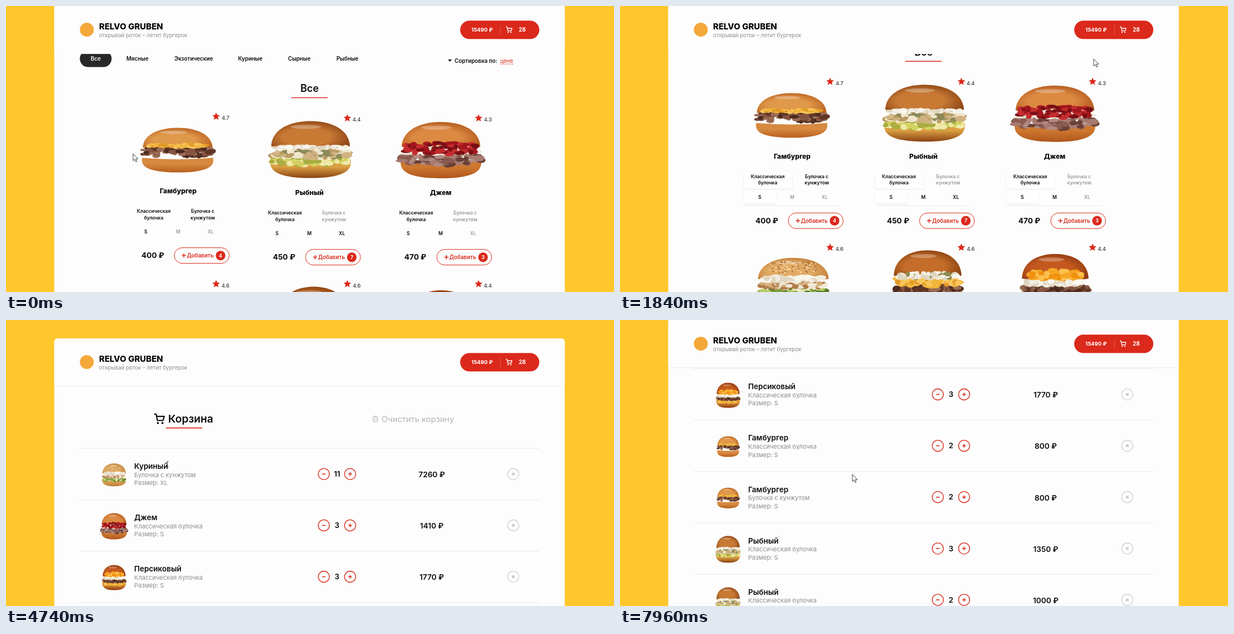
Write an HTML page that moves like this. It is 1091 by 513 pixels and loops after 7.99 s.

```html
<!DOCTYPE html>
<html lang="ru">
<head>
<meta charset="utf-8">
<style>
html, body { margin: 0; height: 100%; overflow: hidden; background: #ffc72c }
svg { display: block; width: 100%; height: 100%; font-family: Inter, "Open Sans", sans-serif }
</style>
</head>
<body>
<svg id="stage" viewBox="0 0 1091 513"></svg>
<script>
const RED = '#db291b', INK = '#0b0b0b', PAPER = '#fdfdfd', GRAY = '#8d8d8d';
const LOOP = 7990, NOTCH = 65.4, OPEN_CART = 3470;

// ---- drawing helpers; text is placed by the middle of its capitals
const text = (x, y, s, size, weight = 600, fill = INK, anchor = 'start') =>
  `<text x="${x}" y="${y + size * .36}" font-size="${size}" font-weight="${weight}" fill="${fill}" text-anchor="${anchor}">${s}</text>`;
const mid = (x, y, s, size, weight, fill) => text(x, y, s, size, weight, fill, 'middle');
const rect = (x, y, w, h, fill, r = 0, more = '') =>
  `<rect x="${x}" y="${y}" width="${w}" height="${h}" rx="${r}" fill="${fill}" ${more}/>`;
const stroke = (d, color, width = 1, more = '') =>
  `<path d="${d}" fill="none" stroke="${color}" stroke-width="${width}" ${more}/>`;
const ring = (x, y, r, color, width = 1.2) =>
  `<circle cx="${x}" cy="${y}" r="${r}" fill="none" stroke="${color}" stroke-width="${width}"/>`;
const group = (id, body, more = '') => `<g id="${id}" ${more}>${body}</g>`;
const cartIcon = (x, y, k, color) =>
  `<g transform="translate(${x} ${y}) scale(${k})">` +
  stroke('M0 1H4L7 15H19L22 6H6', color, 2.6, 'stroke-linejoin="round"') +
  `<circle cx="8" cy="20.5" r="2.3" fill="${color}"/><circle cx="18" cy="20.5" r="2.3" fill="${color}"/></g>`;
const star = (x, y) => {
  const points = Array.from({length: 10}, (_, i) => {
    const r = i % 2 ? 3.3 : 7.2, a = i * Math.PI / 5;
    return `${x + r * Math.sin(a)},${y - r * Math.cos(a)}`;
  });
  return `<polygon points="${points.join(' ')}" fill="${RED}"/>`;
};

// ---- burgers, in a box of 150 by 100 around 0,0
let seed = 7;
const rnd = () => (seed = seed * 16807 % 2147483647) / 2147483647 - .5;
// a band of crumbs, thinner towards its ends
const crumbs = (y, width, height, size, colors) => Array.from({length: 90}, (_, i) => {
  const u = rnd() * 2, v = rnd() * height * Math.sqrt(1 - u * u * .7);
  return `<ellipse cx="${u * width / 2}" cy="${y + v}" rx="${size * (1.2 + rnd())}" ry="${size * (.7 + rnd() * .5)}" fill="${colors[i % colors.length]}"/>`;
}).join('');

const meat = ['#5f3626', '#845440', '#4d2b1e', '#9a6b55'], cream = ['#f1ece0', '#e0d6c0', '#faf7ef'],
  cheese = ['#f2b53a', '#e39a28', '#f8c65a'];
// light and dark crust, lower bun, layers: middle, width, height, crumb, colours
const kinds = {
  ham: ['#e0984a', '#b9601f', '#d78a40', [[4, 132, 22, 6, meat], [-10, 112, 8, 4, cheese]]],
  fish: ['#c87a35', '#8a4212', '#dba044',
    [[20, 132, 14, 5, ['#d3d160', '#efe9a8', '#a9ad40']], [7, 128, 14, 6, ['#cfb280', '#efe6cc', '#8c8a58', '#b99a62']], [-4, 126, 4, 4, cream]]],
  jam: ['#dc8a42', '#b0561c', '#cd7730',
    [[16, 140, 20, 6, ['#8b5d52', '#6b4036', '#a67a70', '#b08a80']], [0, 128, 14, 5, cream], [-3, 124, 20, 5, ['#a3161d', '#c42c2e', '#7a0f16']]]],
  chicken: ['#e2ab64', '#c07c36', '#d99f54',
    [[21, 132, 16, 5, ['#7f9f3a', '#b4ca66', '#567a26', '#e4e3b0']], [7, 122, 14, 5, ['#d5ab76', '#b07c4a', '#f1e8d6']], [-6, 114, 10, 6, cream]]],
  cheesy: ['#c46c2a', '#85400f', '#cf8438',
    [[20, 128, 16, 6, meat], [4, 126, 16, 6, cheese], [-6, 118, 10, 5, [...cream, '#8f8a50']]]],
  peach: ['#c4591f', '#8d3a10', '#d68a34',
    [[26, 122, 10, 5, cheese], [13, 130, 14, 6, meat], [1, 116, 10, 6, cream], [-12, 106, 16, 6, ['#f6a623', '#fcc04d', '#f09010']]]]
};
const burgerDefs = Object.entries(kinds).map(([id, [light, dark, base, layers]]) => {
  const seeds = id == 'chicken' ? crumbs(-30, 90, 26, 1.4, ['#f6e3bd', '#8d5a2c']) : '';
  return `<radialGradient id="${id}Top" cx=".45" cy=".55" r=".6"><stop stop-color="${light}"/><stop offset=".5" stop-color="${light}"/><stop offset="1" stop-color="${dark}"/></radialGradient>` +
    `<linearGradient id="${id}Base" x2="0" y2="1"><stop offset=".4" stop-color="${base}"/><stop offset="1" stop-color="${dark}"/></linearGradient>` +
    group(id,
      `<path d="M-68 17Q0 24 68 17C72 36 58 50 0 50S-72 36-68 17Z" fill="url(#${id}Base)"/>` +
      `<path d="M-67-6C-66-34-38-50 0-50S66-34 67-6Q0 8-67-6Z" fill="url(#${id}Top)"/>` +
      `<ellipse cx="-8" cy="-40" rx="26" ry="3.5" fill="#fff" opacity=".28"/>` + seeds +
      layers.map(l => crumbs(...l)).join(''));
}).join('');
const burger = (id, x, y, w, h) =>
  `<use href="#${id}" transform="translate(${x} ${y}) scale(${w / 150} ${h / 100})"/>`;

// ---- menu page
const tab = (x, y, w, h) =>
  rect(x - .5, y + 2, w + 1, h - 1, '#e7e7e7', 3) + rect(x, y, w, h, '#fefefe', 3);
const addButton = (count, front, back) =>
  rect(302, 502, 98.5, 28, back, 14, `stroke="${RED}"`) +
  stroke('M315.5 516H323M319.2 512.2V519.8', front, 1.5) +
  text(324.5, 516, 'Добавить', 9.8, 600, front) +
  `<circle cx="385" cy="516" r="8.6" fill="${front}"/>` + mid(385, 516, count, 8.8, 700, back);

const card = ([name, rating, price, count, sesame, sizes, art], i) => {
  const tone = on => on ? INK : '#9a9a9a';
  const body = burger(...art) + star(377, 266.5) +
    text(401, 269.3, rating, 9.6, 400, '#222', 'end') +
    mid(309, 400.5, name, 12.1, 800) +
    `<g class="soft">${tab(222, 427, 87, 32)}${tab(222, 464, 58, 21)}${stroke('M225 489H391', '#e8e8e8')}</g>` +
    mid(265, 436.3, 'Классическая', 8.5) + mid(265, 448, 'булочка', 8.5) +
    mid(353, 436.3, 'Булочка с', 8.5, 600, tone(sesame)) + mid(353, 448, 'кунжутом', 8.5, 600, tone(sesame)) +
    ['S', 'M', 'XL'].map((s, k) => mid(250.7 + 58.3 * k, 473.3, s, 8.5, 600, tone(k < sizes))).join('') +
    mid(263.5, 516, price + ' ₽', 13.6, 700) +
    addButton(count, RED, PAPER) + group('fill' + i, addButton(count, '#fff', RED), 'opacity="0"');
  return `<g transform="translate(${235.5 * (i % 3)} ${i > 2 ? 297.5 : 0})">${group('card' + i, body)}</g>`;
};
const cards = [
  ['Гамбургер', 4.7, 400, 4, 1, 1, ['ham', 308, 327, 140, 80]],
  ['Рыбный', 4.4, 450, 7, 0, 3, ['fish', 311, 323, 158, 102]],
  ['Джем', 4.3, 470, 3, 0, 2, ['jam', 309.5, 324, 158, 101]],
  ['Куриный', 4.6, 660, 11, 1, 3, ['chicken', 311, 328, 142, 86]],
  ['Сырный', 4.6, 500, 2, 0, 2, ['cheesy', 316.5, 323, 136, 103]],
  ['Персиковый', 4.4, 590, 3, 0, 2, ['peach', 310, 328, 134, 100]]
];
const filters = [['Мясные', 216], ['Экзотические', 302], ['Куриные', 416.5], ['Сырные', 506], ['Рыбные', 593]];
const menu = rect(132.5, 145, 57, 30, '#282828', 15) + mid(161, 160, 'Все', 9.8, 600, '#fff') +
  filters.map(([s, x]) => text(x, 160, s, 9.8)).join('') +
  `<path d="M793 161.3H800L796.5 165.2Z" fill="${INK}"/>` +
  text(805, 163.5, 'Сортировка по:', 9.8) + text(887, 163.5, 'цене', 9.8, 400, RED) +
  stroke('M887 169.5H911', RED, 1, 'stroke-dasharray="2 1.5"') +
  mid(544.7, 213, 'Все', 18, 600) + stroke('M512 230H577', RED, 1.5) +
  cards.map(card).join('');

// ---- cart page
const CLASSIC = 'Классическая булочка', SESAME = 'Булочка с кунжутом';
const rows = [
  ['Куриный', SESAME, 'XL', 11, 7260, 'chicken', 47, 41],
  ['Джем', CLASSIC, 'S', 3, 1410, 'jam', 50, 47],
  ['Персиковый', CLASSIC, 'S', 3, 1770, 'peach', 46, 45],
  ['Гамбургер', CLASSIC, 'S', 2, 800, 'ham', 43, 37],
  ['Гамбургер', SESAME, 'S', 2, 800, 'ham', 43, 37],
  ['Рыбный', CLASSIC, 'S', 3, 1350, 'fish', 47, 48],
  ['Рыбный', CLASSIC, 'XL', 2, 1000, 'fish', 47, 48]
];
const row = ([name, bun, size, count, sum, art, w, h], i) => {
  const y = 230.3 + 92.1 * i, c = y + 46;
  return stroke(`M132 ${y}H957`, '#e8e8e8') + burger(art, 194, y + 47.5, w, h) +
    text(230, y + 32, name, 13.5) +
    text(230, y + 47.5, bun, 11, 400, GRAY) + text(230, y + 62, 'Размер: ' + size, 11, 400, GRAY) +
    ring(570.3, c, 10, RED, 1.3) + ring(617.5, c, 10, RED, 1.3) +
    stroke(`M567 ${c}h6.6M614.2 ${c}h6.6m-3.3-3.3v6.6`, RED, 1.5) +
    mid(594, c, count, 13.3, 600) + mid(764, c + 1, sum + ' ₽', 13.6, 600) +
    ring(910.3, c, 10, '#cacaca') + stroke(`M908 ${c - 2.3}l4.6 4.6m0-4.6l-4.6 4.6`, '#b4b4b4', 1.3);
};
const cart = cartIcon(266, 168, .82, INK) + text(291, 177.5, 'Корзина', 19.2, 600) +
  stroke('M287 193.7H352', RED, 1.7) +
  stroke('M657.5 174H668M661 174V172.3H664.5V174M658.7 174V182.7H666.8V174M661.3 176.5V180.5M664.2 176.5V180.5', '#b6b6b6') +
  text(674, 177.5, 'Очистить корзину', 14.7, 400, '#b4b4b4') + rows.map(row).join('');

// ---- sticky header
const header = rect(86.6, 0, 916, 86, PAPER, 6) +
  group('edge', stroke('M91 85.5H999', '#ebebeb')) +
  '<circle cx="145" cy="42.5" r="12.5" fill="#f4a83a"/>' +
  text(167, 36.3, 'RELVO GRUBEN', 15, 800) +
  text(167, 52.2, 'открывай роток – летит бургерок', 9.7, 400, GRAY) +
  rect(815, 26.3, 142, 33, RED, 16.5) + group('dark', rect(815, 26.3, 142, 33, '#b72218', 16.5)) +
  text(835, 42.6, '15490 ₽', 9.6, 700, '#fff') + stroke('M887.3 35V51', '#fff', 1, 'opacity=".25"') +
  cartIcon(897, 37, .5, '#fff') + group('total', text(920, 42.6, '28', 10, 700, '#fff')) +
  group('go', stroke('M921.5 42.5H931M927 38.3L931.2 42.5L927 46.7', '#fff', 1.5));

const pointer = d => `<path d="${d}" fill="#fff" stroke="#111" stroke-width=".8" stroke-linejoin="round"/>`;
const cursors = {
  arrow: pointer('M0 0V12.5L2.9 9.9L4.9 14.5L6.9 13.6L5 9.2H8.9Z'),
  hand: pointer('M-1.5 1.5Q0-.9 1.5 1.5V6.5L7 8Q8.8 8.6 8.4 11L7.4 16H.4L-4 10.4Q-4.6 8.4-2.8 8.5L-1.5 9.6Z'),
  beam: stroke('M-2.2-5Q0-5 0-4Q0-5 2.2-5M0-4V4M-2.2 5Q0 5 0 4Q0 5 2.2 5', '#222', .9)
};

stage.innerHTML = `<defs>${burgerDefs}</defs>` + rect(0, 0, 1091, 513, '#ffc72c') +
  group('page', rect(86.6, 33, 916, 1300, PAPER, 6) + group('menu', menu) + group('cart', cart)) +
  group('head', header) +
  group('cursor', Object.entries(cursors).map(([id, body]) => group(id, body)).join(''));
const el = id => document.getElementById(id);
const soft = document.querySelectorAll('.soft');

// ---- motion
const ramp = (t, a, b) => {
  const u = Math.min(1, Math.max(0, (t - a) / (b - a)));
  return u * u * (3 - 2 * u);
};
// start, end and direction of each wheel notch
const notches = [[310, 470, 1], [1920, 2070, -1], [2110, 2260, -1], [5500, 5655, 1],
  [5960, 6230, 1], [6520, 6720, 1], [6970, 7150, 1], [7400, 7560, 1]];
const track = [[0, 228, 265], [500, 228, 265], [1060, 300, 330], [1110, 300, 330], [1330, 580, 378],
  [1420, 664.5, 382], [1600, 780, 300], [1840, 850, 95], [1920, 850, 95], [2300, 924, 138],
  [2690, 925, 86], [2750, 925, 86], [2860, 924, 73], [2980, 922.5, 80], [3890, 922.5, 80],
  [4680, 294, 258], [4710, 294, 258], [4850, 274, 261], [7590, 274, 261], [7960, 417, 277], [LOOP, 417, 277]];
const lifts = [[-200, -100, 1110, 1260], [1200, 1300, 1430, 1560], [1480, 1600, 1720, 1840]];
const pulse = (t, [a, b, c, d]) => ramp(t, a, b) - ramp(t, c, d);

const place = (t) => {
  const i = Math.max(1, track.findIndex(k => k[0] >= t));
  const [t0, x0, y0] = track[i - 1], [t1, x1, y1] = track[i], u = (t - t0) / (t1 - t0);
  return [x0 + (x1 - x0) * u, y0 + (y1 - y0) * u];
};
const move = (id, x, y) => el(id).setAttribute('transform', `translate(${x} ${y})`);
const fade = (id, v) => el(id).setAttribute('opacity', v);

function draw(t) {
  const scroll = NOTCH * notches.reduce((sum, [a, b, dir]) => sum + dir * ramp(t, a, b), 1);
  move('page', 0, -scroll);
  move('head', 0, Math.max(0, 33 - scroll));
  fade('menu', t < OPEN_CART ? 1 : 0);
  fade('cart', ramp(t, OPEN_CART, OPEN_CART + 120));
  fade('edge', t < 1920 ? 0 : 1);
  soft.forEach(s => s.setAttribute('opacity', t < 310 ? 0 : 1));
  lifts.forEach((k, i) => move('card' + i, 0, -3 * pulse(t, k)));
  fade('fill1', pulse(t, [1290, 1380, 1430, 1560]));

  const hover = pulse(t, [2590, 2690, 3930, 4040]);
  fade('dark', hover);
  fade('go', hover);
  fade('total', 1 - hover);

  const shape = t > 2570 && t < 3960 ? 'hand' : t > 4560 && t < 7620 ? 'beam' : 'arrow';
  Object.keys(cursors).forEach(id => fade(id, id == shape ? 1 : 0));
  move('cursor', ...place(t));
}

const start = performance.now();
const tick = () => {
  draw((performance.now() - start) % LOOP);
  requestAnimationFrame(tick);
};
tick();
</script>
</body>
</html>
```
